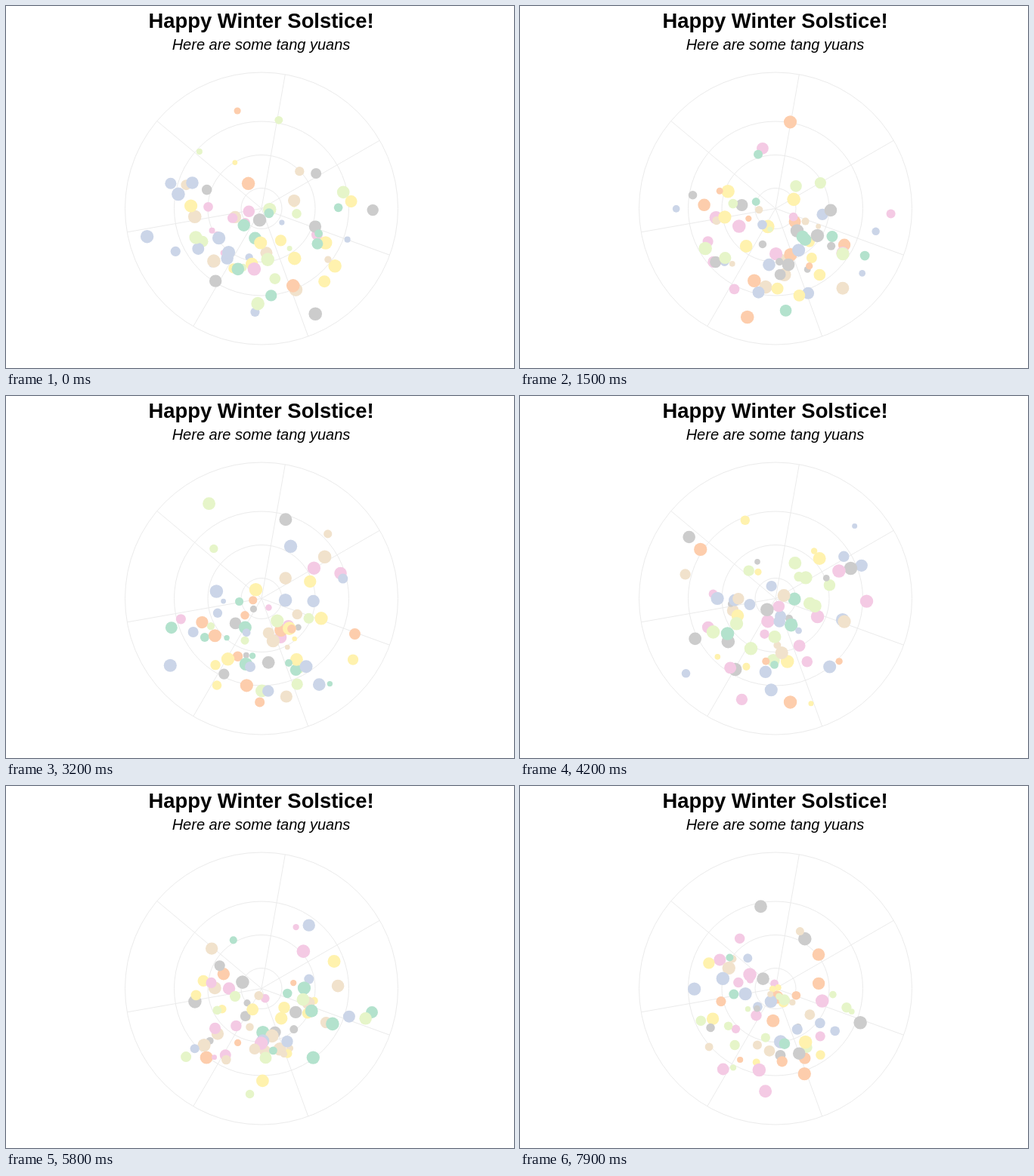
An HTML page for the animation above (8 s loop, 672 by 480 pixels).

```html
<!DOCTYPE html>
<html lang="en">
<head>
<meta charset="utf-8">
<title>Happy Winter Solstice!</title>
<style>
  html, body { margin: 0; width: 100%; height: 100%; overflow: hidden; background: #fff; }
  svg { display: block; width: 672px; height: 480px; }
  text { font-family: "Liberation Sans", Arial, sans-serif; text-anchor: middle; }
  .title { font-size: 27.4px; font-weight: bold; }
  .subtitle { font-size: 20px; font-style: italic; }
  .grid { fill: none; stroke: #ebebeb; stroke-width: 1; }
</style>
</head>
<body>
<svg viewBox="0 0 672 480">
  <text class="title" x="337.5" y="29">Happy Winter Solstice!</text>
  <text class="subtitle" x="337.5" y="58">Here are some tang yuans</text>
  <g class="grid"></g>
  <g class="dots"></g>
</svg>
<script>
const LOOP = 8000, TICK = 100, COUNT = 75;
const CX = 338, CY = 268.5, EDGE = 180.5;
const COLORS = ['#b3e2cd', '#fdcdac', '#cbd5e8', '#f4cae4', '#e6f5c9', '#fff2ae', '#f1e2cc', '#cccccc'];

function add(parent, tag, attrs = {}) {
  const el = document.createElementNS('http://www.w3.org/2000/svg', tag);
  setAll(el, attrs);
  return parent.appendChild(el);
}

function setAll(el, attrs) {
  for (const key in attrs) el.setAttribute(key, attrs[key]);
}

// Angles are in degrees, clockwise from the top.
function toXY(angle, dist) {
  const a = angle * Math.PI / 180;
  return [CX + dist * Math.sin(a), CY - dist * Math.cos(a)];
}

function makeRandom(seed) {
  let state = Math.imul(seed + 1, 0x9e3779b1);
  return () => {
    state = (state + 0x6d2b79f5) | 0;
    let v = Math.imul(state ^ (state >>> 15), state | 1);
    v ^= v + Math.imul(v ^ (v >>> 7), v | 61);
    return ((v ^ (v >>> 14)) >>> 0) / 4294967296;
  };
}

// Bell-shaped value, drawn again when it leaves the range.
function normal(random, mean, sd, min, max) {
  let v;
  do {
    v = mean + sd * Math.sqrt(-2 * Math.log(1 - random())) * Math.cos(2 * Math.PI * random());
  } while (v < min || v > max);
  return v;
}

function drawGrid() {
  const grid = document.querySelector('.grid');
  for (const r of [27, 71, 115.5, EDGE]) add(grid, 'circle', { cx: CX, cy: CY, r });
  for (let angle = 10; angle <= 310; angle += 50) {
    const [x2, y2] = toXY(angle, EDGE);
    add(grid, 'line', { x1: CX, y1: CY, x2, y2 });
  }
}

drawGrid();
const layer = document.querySelector('.dots');
const dots = Array.from({ length: COUNT }, () => add(layer, 'circle'));

// Every tick scatters the dots afresh.
function scatter(tick) {
  const random = makeRandom(tick);
  for (const dot of dots) {
    const angle = normal(random, 185, 85, 5, 355);
    const dist = normal(random, 75, 42, 3, 158);
    const [cx, cy] = toXY(angle, dist);
    const r = 8.8 - 5.5 * random() ** 2.2;
    const fill = COLORS[Math.floor(random() * COLORS.length)];
    setAll(dot, { cx, cy, r, fill });
  }
}

const start = performance.now();
let shown = -1;
function loop() {
  const tick = Math.floor((performance.now() - start) % LOOP / TICK);
  if (tick !== shown) scatter(shown = tick);
  requestAnimationFrame(loop);
}
loop();
</script>
</body>
</html>
```
